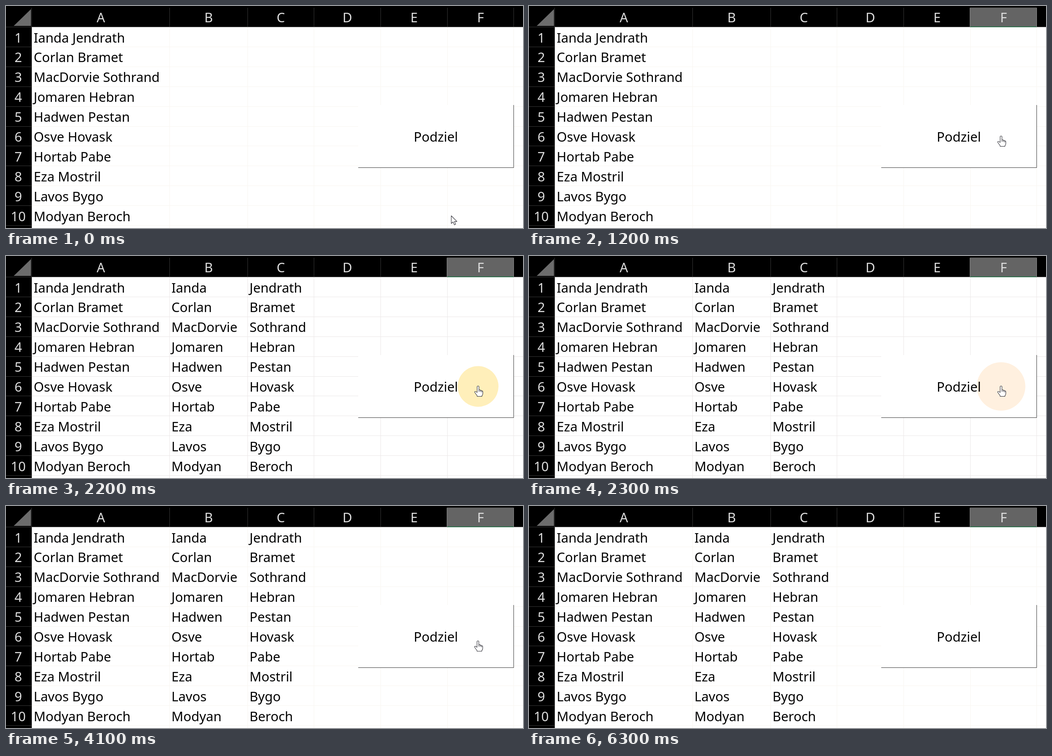
These frames come from a looping animation (1139 px wide and 491 px high, 6400 ms). An HTML page:

```html
<!DOCTYPE html>
<html lang="pl">
<head>
<meta charset="utf-8">
<title>Podziel</title>
<style>
  html, body { margin: 0; height: 100%; overflow: hidden; background: #fff; }
  svg { display: block; width: 100vw; height: 100vh; }
  text { font: 28.9px "Noto Sans", "Open Sans", sans-serif; }
  .head { fill: #dedede; text-anchor: middle; }
  #cursor path { fill: #fff; stroke: #35353d; stroke-width: 1.1; stroke-linejoin: round; }
</style>
</head>
<body>
<svg viewBox="0 0 1139 491">
  <path id="grid" fill="none"/>
  <path d="M0 0H1139V46.6H57V491H0Z"/>
  <path id="seps" fill="none" stroke="#343434"/>
  <path d="M55 7V44H17Z" fill="#6c6c6c"/>
  <g id="selected">
    <path d="M972 3.5H1118V46H972Z" fill="#646464"/>
    <path d="M971.5 4V46M1118.5 4V46" stroke="#8a8a8a"/>
    <path d="M972 46H1118" stroke="#217346" stroke-width="1.5"/>
  </g>
  <g id="labels"></g>
  <g id="parts"></g>
  <path d="M776 219H1118V358H776Z" fill="#fff"/>
  <path d="M776 357.5H1118.5V219" fill="none" stroke="#404040"/>
  <circle id="ripple" cx="1040" cy="288.5"/>
  <text x="947" y="300" text-anchor="middle">Podziel</text>
  <g id="cursor">
    <path id="arrow" d="M0 0V17L4 13.5L6.8 20L9.6 18.8L7 12.6H12.5Z"/>
    <path id="hand" d="M-2.5 14V1.5a2 2 0 0 1 4 0V8q3-1 3 1.5q3-1 3 1q2.5-.5 2.5 2V16q0 3-2 5V22.5H-2.5V21L-7.5 14q-1-2 .5-2.5t4.5 2.5M1.5 8v4M4.5 9.5v3M7.5 10.5v3"/>
  </g>
</svg>
<script>
const LOOP = 6400, ROW = 43.9, TOP = 46;
const edges = [57, 360, 532, 678, 825, 972, 1118];
const people = ["Ianda Jendrath", "Corlan Bramet", "MacDorvie Sothrand", "Jomaren Hebran",
  "Hadwen Pestan", "Osve Hovask", "Hortab Pabe", "Eza Mostril", "Lavos Bygo", "Modyan Beroch"];
const rest = [975, 448], button = [1040.5, 288];

const $ = id => document.getElementById(id);
const show = (id, on) => $(id).style.display = on ? "" : "none";

function addText(parent, str, x, y, cls = "") {
  const el = document.createElementNS("http://www.w3.org/2000/svg", "text");
  el.setAttribute("x", x);
  el.setAttribute("y", y);
  el.setAttribute("class", cls);
  el.textContent = str;
  $(parent).append(el);
}

function buildSheet() {
  let grid = "", seps = "M56.5 46V491";
  edges.forEach((x, i) => {
    seps += `M${x - (i ? -.5 : .5)} 4V46`;
    if (i) grid += `M${x + .5} 46V491`;
    if (i < 6) addText("labels", "ABCDEF"[i], (x + edges[i + 1]) / 2 + .5, 36, "head");
  });
  seps += "M0 46.5H57";
  people.forEach((name, i) => {
    const y = TOP + ROW * i, line = Math.round(y + ROW) + .5;
    grid += `M57 ${line}H1139`;
    seps += `M0 ${line}H57`;
    addText("labels", i + 1, 27, y + 34.5, "head");
    addText("labels", name, 61, y + 34.5);
    name.split(" ").forEach((part, k) => addText("parts", part, edges[k + 1] + 4.5, y + 34.5));
  });
  $("grid").setAttribute("d", grid);
  $("seps").setAttribute("d", seps);
}

// Six-step glide; x starts later than y
function glide(from, to, t) {
  const p = Math.min(1, Math.max(0, (Math.floor(t / 100) + 1) / 6));
  const e = Math.sin(p * Math.PI / 2) ** 2;
  return [from[0] + (to[0] - from[0]) * e * e, from[1] + (to[1] - from[1]) * e];
}

function cursorAt(t) {
  if (t < 100) return [981, 464];
  if (t < 4100) return glide(rest, button, t - 700);
  return glide(button, rest, t - 4100);
}

function draw(t) {
  const clicking = t >= 2000 && t < 2400;
  show("selected", t >= 100);
  show("parts", t >= 2000);
  $("grid").setAttribute("stroke", clicking ? "#ece8e8" : "#f9f6f1");

  show("ripple", clicking);
  const k = Math.floor((t - 2000) / 100);
  $("ripple").setAttribute("r", 28 + 8.5 * k);
  $("ripple").setAttribute("fill", `rgb(255,${237 + k},${112 + 37 * k})`);

  const [x, y] = cursorAt(t), over = y < 358;
  show("cursor", t < 6300);
  show("hand", over);
  show("arrow", !over);
  $("cursor").setAttribute("transform", `translate(${x} ${y})`);
}

buildSheet();
const start = performance.now();
function tick() {
  draw((performance.now() - start) % LOOP);
  requestAnimationFrame(tick);
}
tick();
</script>
</body>
</html>
```
